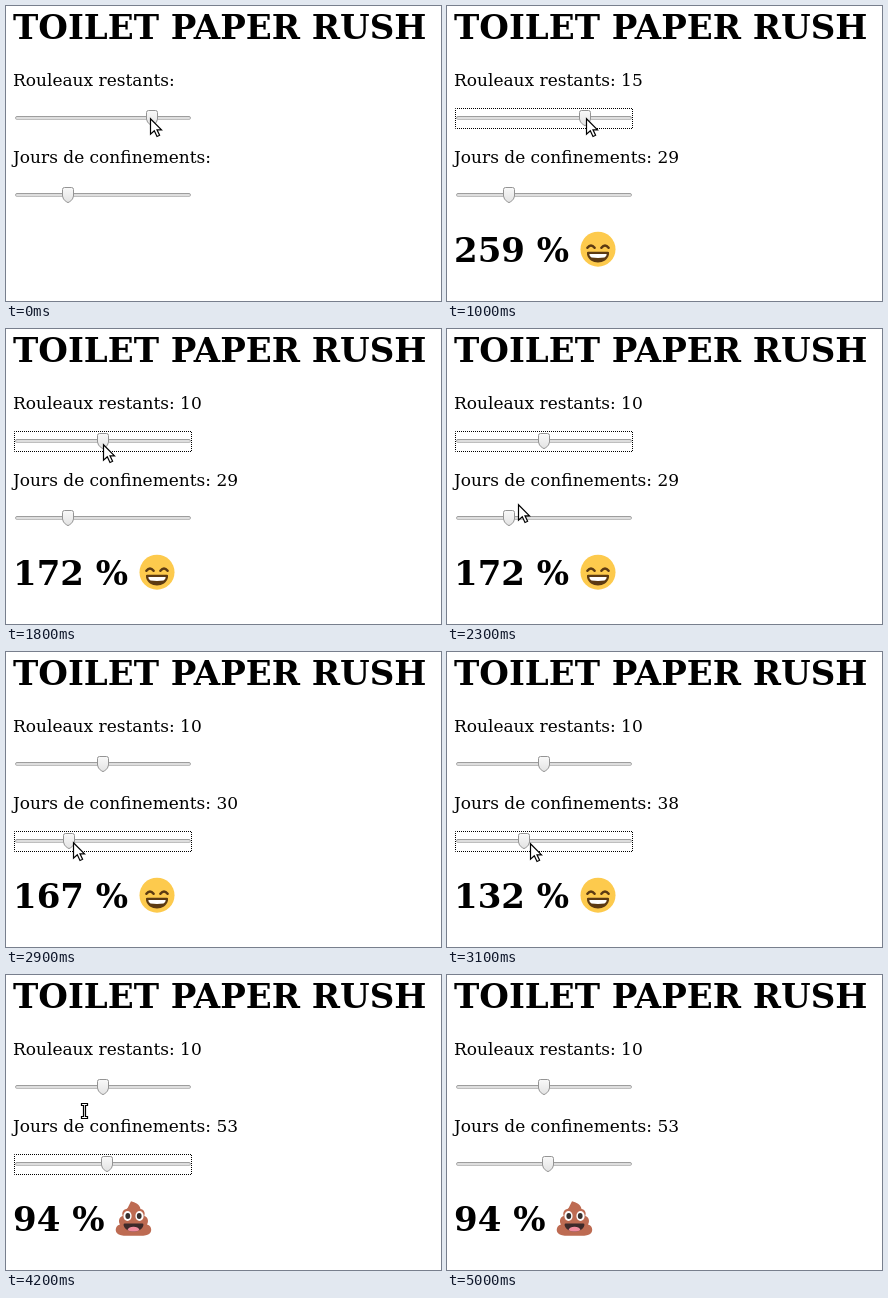
An HTML page with a canvas for the animation above (5300 ms loop, 435 px wide and 295 px high).

```html
<!DOCTYPE html>
<html lang="fr">
<head>
<meta charset="utf-8">
<title>Toilet Paper Rush</title>
<style>
html, body { margin: 0; width: 100%; height: 100%; overflow: hidden; background: #fff; }
body { position: relative; font: 17px "DejaVu Serif", serif; color: #000; }
p, h1, canvas { position: absolute; margin: 0; }
p, h1 { left: 7px; white-space: pre; line-height: normal; }
h1 { font-size: 34px; font-weight: bold; }
canvas { left: 0; top: 0; }
</style>
</head>
<body>
<h1 style="top:1px">TOILET PAPER RUSH</h1>
<p style="top:64px">Rouleaux restants: <span id="rolls"></span></p>
<p style="top:141px">Jours de confinements: <span id="days"></span></p>
<h1 id="percent" style="top:224px"></h1>
<canvas id="stage" width="435" height="295"></canvas>
<script>
const LOOP = 5300;
const ctx = document.getElementById('stage').getContext('2d');
const byId = id => document.getElementById(id);

// Each step: time, then the state that changes from there on.
const steps = [
  [0, { rolls: 16, days: 29, shown: false, focus: 0, x: 144, y: 111 }],
  [700, { focus: 1 }],
  [1000, { rolls: 15, shown: true, x: 139 }],
  [1100, { x: 135, y: 112 }],
  [1200, { rolls: 14, x: 129 }],
  [1300, { x: 123, y: 113 }],
  [1400, { rolls: 13, x: 116 }],
  [1500, { rolls: 12, x: 110, y: 114 }],
  [1600, { rolls: 11, x: 105 }],
  [1700, { x: 101 }],
  [1800, { rolls: 10, x: 97 }],
  [1900, { x: 94, y: 110 }],
  [2100, { x: 90, y: 121 }],
  [2200, { x: 81, y: 147 }],
  [2300, { x: 71, y: 174 }],
  [2400, { x: 65, y: 187 }],
  [2600, { x: 55, y: 189 }],
  [2900, { days: 30, focus: 2, x: 67, y: 189 }],
  [3000, { days: 33, x: 74 }],
  [3100, { days: 38, x: 83, y: 190 }],
  [3200, { days: 44, x: 92 }],
  [3300, { days: 51, x: 97 }],
  [3400, { days: 52, x: 99 }],
  [3500, { days: 53, x: 100 }],
  [3600, { x: 101 }],
  [4200, { x: 79, y: 136 }],
  [4300, { x: 72, y: 98 }],
  [4400, { x: 65, y: 60 }],
  [4500, { x: 59, y: 22 }],
  [4600, { x: 54, y: -17 }],
  [4800, { y: -40 }],
  [5000, { focus: 0 }]
];

function stateAt(time) {
  const state = {};
  for (const [start, change] of steps) if (start <= time) Object.assign(state, change);
  return state;
}

function setText(id, text) {
  const el = byId(id);
  if (el.textContent !== text) el.textContent = text;
}

function paint(path, fill, stroke, width = 1) {
  if (fill) { ctx.fillStyle = fill; ctx.fill(path); }
  if (stroke) { ctx.strokeStyle = stroke; ctx.lineWidth = width; ctx.stroke(path); }
}

const shape = d => new Path2D(d);

function at(x, y, draw) {
  ctx.save();
  ctx.translate(x, y);
  draw();
  ctx.restore();
}

function oval(x, y, rx, ry, color) {
  const path = new Path2D();
  path.ellipse(x, y, rx, ry, 0, 0, 2 * Math.PI);
  paint(path, color);
}

const thumb = shape('M-3.5-7.5H3.5Q5.5-7.5 5.5-5.5V1Q5.5 4 1.5 7Q0 8-1.5 7Q-5.5 4-5.5 1V-5.5Q-5.5-7.5-3.5-7.5Z');

function slider(y, fraction, focused) {
  const track = new Path2D();
  track.roundRect(9.5, y - 1.5, 175, 3, 1.5);
  const groove = ctx.createLinearGradient(0, y - 2, 0, y + 2);
  groove.addColorStop(0, '#989898');
  groove.addColorStop(1, '#c4c4c4');
  paint(track, '#dedede', groove);

  if (focused) {
    ctx.save();
    ctx.setLineDash([1, 1]);
    ctx.lineDashOffset = 0.5; // keeps the dots on whole pixels
    ctx.lineWidth = 1;
    ctx.strokeStyle = '#000';
    ctx.strokeRect(8.5, y - 9.5, 177, 20);
    ctx.restore();
  }

  at(Math.round(16 + 162 * fraction), y, () => {
    const face = ctx.createLinearGradient(0, -8, 0, 8);
    face.addColorStop(0, '#fafafa');
    face.addColorStop(1, '#e2e2e2');
    paint(thumb, face, '#949494');
  });
}

function grin() {
  const brown = '#5c3a12';
  oval(0, 0, 17.5, 17.5, '#fdca4d');
  ctx.lineCap = 'round';
  paint(shape('M-10.6-1.5Q-7-6-3.4-1.5M3.4-1.5Q7-6 10.6-1.5'), null, brown, 2.5);
  paint(shape('M-10 2.6H10Q11.5 2.6 11 5C9 16-9 16-11 5Q-11.5 2.6-10 2.6Z'), brown);
  paint(shape('M-8.7 4.8H8.7Q8.5 8 6.5 8.4Q0 9.2-6.5 8.4Q-8.5 8-8.7 4.8Z'), '#fff');
}

function poop() {
  paint(shape('M-2.5-17.3C1.5-16.5 6.5-14 7-9.5C10.5-9 12-6 10.8-2.5C14.5-1.5 15.5 3 13.5 6C17.5 7 19 11.5 16.5 14.8C13.5 18 7 17.2 0 17.2C-7 17.2-13.5 18-16.5 14.8C-19 11.5-17.5 7-13.5 6C-15.5 3-14.5-1.5-10.8-2.5C-12-6-10.5-9-7-9.5C-5-11-4.5-14-2.5-17.3Z'), '#bd6b52');
  for (const side of [-1, 1]) {
    oval(side * 6, -2.5, 4.1, 5, '#fff');
    oval(side * 5.7, -2.5, 2.4, 2.9, '#35302f');
  }
  const mouth = shape('M-9 5H9Q10.3 5 9.8 7C7.5 15-7.5 15-9.8 7Q-10.3 5-9 5Z');
  paint(mouth, '#3d2a2a');
  ctx.save();
  ctx.clip(mouth);
  oval(0, 12, 6, 3.8, '#f08b9d');
  ctx.restore();
}

const arrow = shape('M.5 1.8V17.2L4.3 13.8L7 19.5L9.6 18.3L7 12.8H11.5Z');
const beam = shape('M-3.5-7.5H2.5V-5.5H.5V5.5H2.5V7.5H-3.5V5.5H-1.5V-5.5H-3.5Z');

function pointer(x, y) {
  const overText = [[0, 42], [54, 90], [126, 168]].some(([top, bottom]) => y >= top && y <= bottom);
  ctx.lineJoin = 'miter';
  at(x, y, () => paint(overText ? beam : arrow, '#fff', '#000', 1.2));
}

function render(time) {
  const { rolls, days, shown, focus, x, y } = stateAt(time);
  const percent = Math.round(500 * rolls / days);
  setText('rolls', shown ? String(rolls) : '');
  setText('days', shown ? String(days) : '');
  setText('percent', shown ? percent + ' %' : '');

  ctx.clearRect(0, 0, 435, 295);
  slider(112, rolls / 20, focus === 1);
  slider(189, (days - 1) / 99, focus === 2);
  if (shown) {
    if (percent >= 100) at(151, 243.2, grin);
    else at(127.5, 243.5, poop);
  }
  pointer(x, y);
}

const begin = performance.now();
function tick() {
  render((performance.now() - begin) % LOOP);
  requestAnimationFrame(tick);
}
tick();
</script>
</body>
</html>
```
